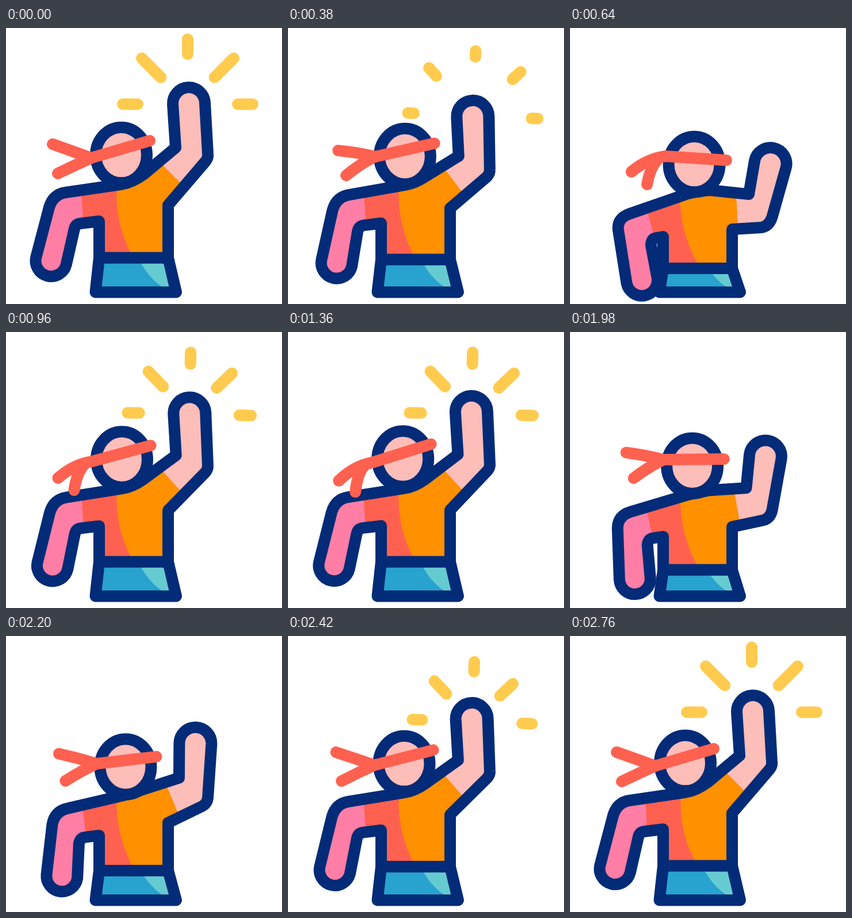
Recreate the animation shown at these times as an HTML page. Size 480 px wide and 480 px high, loop 2.98 s.

```html
<!DOCTYPE html>
<html lang="en">
<head>
<meta charset="utf-8">
<title>Raised fist</title>
<style>
  html, body { margin: 0; width: 100%; height: 100%; overflow: hidden; background: #fff; }
  svg { display: block; width: 100vw; height: 100vh; }
  .line { fill: none; stroke: #032b77; stroke-width: 20; stroke-linecap: round; stroke-linejoin: round; }
  .band, .ray { fill: none; stroke: #ff6150; stroke-width: 20; stroke-linecap: round; stroke-linejoin: round; }
  .ray { stroke: #ffcb4f; }
</style>
</head>
<body>
<svg viewBox="0 0 480 480">
  <defs>
    <clipPath id="bodyClip"><path id="clipShape"/></clipPath>
    <clipPath id="beltClip"><path id="beltShape"/></clipPath>
  </defs>
  <g clip-path="url(#bodyClip)">
    <rect width="480" height="480" fill="#ff6150"/>
    <path id="shirt" fill="#ff9000"/>
    <path id="sleeve" fill="#ff7ea5"/>
    <path id="skin" fill="#fdbdb9"/>
  </g>
  <path id="body" class="line"/>
  <g clip-path="url(#beltClip)">
    <rect width="480" height="480" fill="#28a2ce"/>
    <path d="M233 405Q246 432 271 450L310 470L290 390Z" fill="#66cbd1"/>
  </g>
  <path id="belt" class="line"/>
  <ellipse id="head" rx="44.5" ry="48.3" class="line" style="fill:#fdbdb9"/>
  <path id="band" class="band"/>
  <path id="tails" class="band"/>
  <path id="rays" class="ray"/>
</svg>
<script>
const LOOP = 2980;
const $ = id => document.getElementById(id);
const draw = (id, d) => $(id).setAttribute('d', d);
const mix = (a, b, k) => a + (b - a) * k;
const sine = t => (1 - Math.cos(Math.PI * t)) / 2;

// Each part: keyed values, 0 = arm raised, 1 = fully crouched.
const TRACKS = {
  body: [[220, 0], [790, 1], [1000, 0], [1200, .7], [1400, 0], [1600, .7], [1800, 0], [2000, .7], [2760, 0]],
  waist: [[220, 0], [790, 1], [960, 0], [1200, .7], [1360, 0], [1600, .7], [1760, 0], [2000, .7], [2760, 0]],
  head: [[220, 0], [790, 1], [1000, -.02], [1200, .6], [1400, -.12], [1600, .6], [1800, -.12], [2000, .7], [2760, 0]],
  droop: [[220, 0], [700, 1], [1000, 1], [1200, .8], [1400, 1.08], [1600, .8], [1800, 1.08], [2000, .2], [2760, 0]],
  rays: [[220, 0], [800, 1], [1000, 0], [1200, 1], [1400, 0], [1600, 1], [1800, 0], [2000, 1], [2760, 0]]
};

function sample(track, t) {
  if (t <= track[0][0]) return { v: track[0][1], rising: true };
  for (let i = 1; i < track.length; i++) {
    const [t0, a] = track[i - 1], [t1, b] = track[i];
    if (t < t1) {
      let k = (t - t0) / (t1 - t0);
      if (i === track.length - 1) k = 1 - Math.pow(1 - k, 1.72); // slow settle
      return { v: mix(a, b, sine(k)), rising: b < a };
    }
  }
  return { v: 0, rising: true };
}

// Quadratic through raised, middle and low poses.
const MID = .45, LOW = .84;
const bend = (p, a, b, c) =>
  a * (p - MID) * (p - LOW) / (MID * LOW) +
  b * p * (p - LOW) / (MID * (MID - LOW)) +
  c * p * (p - MID) / (LOW * (LOW - MID));

const fix = n => n.toFixed(2);
const xy = (x, y) => fix(x) + ' ' + fix(y) + ' ';

function cap(x, y, deg, r) {
  const a = deg * Math.PI / 180, c = r * Math.cos(a), s = r * Math.sin(a);
  return { left: xy(x - c, y - s), right: xy(x + c, y + s) };
}

function drawBody(p, w) {
  const n = (a, b, c) => bend(p, a, b, c);
  const pt = (ax, ay, bx, by, cx, cy) => xy(n(ax, bx, cx), n(ay, by, cy));
  const waist = bend(w, 399.7, 408, 418);
  const low = cap(n(78.5, 97.5, 125), n(405, 418, 439), n(14, 7, -10), 27);
  const high = cap(n(318, 329.5, 348.5), n(131, 187, 236), n(-3, 2, 12), 28);

  const d = 'M' + xy(162, waist) +
    'L' + pt(162, 336, 162, 347, 162, 363) +
    'L' + pt(129, 340, 138, 350, 150, 365) +
    'Q' + pt(121, 341, 129, 351, 141, 366) + pt(119, 349, 127, 361, 141, 378) +
    'L' + low.right + 'A27 27 0 0 1 ' + low.left +
    'L' + pt(75, 312, 80.5, 328, 84, 352) +
    'Q' + pt(82, 289, 84.5, 305, 81, 331) + pt(104, 286, 107, 300, 104, 323) +
    'L' + pt(200, 272, 205, 277, 205, 288) +
    'Q' + pt(220, 269, 222, 274, 222, 284) + pt(240, 254, 238, 267, 243, 282) +
    'L' + pt(295, 208, 301, 247, 311, 289) +
    'L' + high.left + 'A28 28 0 0 1 ' + high.right +
    'L' + pt(351, 219, 351, 282, 352, 327) +
    'Q' + pt(352, 226, 350, 291, 347, 345) + pt(347, 232, 342, 296, 332, 347) +
    'L' + pt(282, 308, 282, 325, 282, 350) +
    'L' + xy(282, waist) + 'Z';
  draw('body', d);
  draw('clipShape', d);

  draw('shirt', 'M191 200L' + xy(n(192.5, 192, 191), 280) +
    'Q' + xy(n(190, 191, 189), n(345, 350, 358)) + xy(n(221.5, 224, 227), waist) + 'L320 ' + fix(waist) + 'V200Z');
  draw('sleeve', 'M0 0L' + pt(131, 285, 133, 300, 134, 318) +
    'L' + pt(134, 335, 139, 345, 146, 362) + 'V480H0Z');
  const top = pt(262, 228, 280, 262, 289, 290);
  draw('skin', 'M' + top + 'V0H480V480L' + pt(310, 276, 300, 310, 292, 345) + 'Z');

  const belt = 'M' + xy(162, waist) + 'L155.5 459.5H296L' + xy(282, waist) + 'Z';
  draw('belt', belt);
  draw('beltShape', belt);
}

function drawHead(h, droop) {
  const n = (a, b, c) => bend(h, a, b, c);
  $('head').setAttribute('cx', fix(n(200.5, 208, 216)));
  $('head').setAttribute('cy', fix(n(221, 227.5, 237)));
  const kx = n(148, 158, 166), ky = n(226, 222, 223);
  draw('band', 'M' + xy(kx, ky) + 'L' + xy(n(250, 261.5, 272), n(196, 210, 230)));
  const at = (ax, ay, bx, by) => xy(kx + mix(ax, bx, droop), ky + mix(ay, by, droop));
  draw('tails',
    'M' + xy(kx, ky) + 'Q' + at(-33, -12, -32, 5) + at(-67, -24, -59, 29) +
    'M' + at(0, 0, -12, 4) + 'Q' + at(-29, 13, -26, 17) + at(-58, 27, -31, 50));
}

function drawRays({ v, rising }) {
  const from = rising ? 0 : v / .3;
  const to = rising ? 1 - v / .42 : 1;
  let d = '';
  if (to > from) {
    for (let i = 0; i < 5; i++) {
      const a = (180 + 45 * i + 14 * v) * Math.PI / 180;
      const inner = i % 2 ? 66 : 87;
      const spot = k => {
        const r = mix(inner, 113, k);
        return xy(316 + 30 * v + r * Math.cos(a), 132.5 + 113 * v + r * Math.sin(a));
      };
      d += 'M' + spot(from) + 'L' + spot(to);
    }
  }
  draw('rays', d);
}

function render(t) {
  drawBody(sample(TRACKS.body, t).v, sample(TRACKS.waist, t).v);
  drawHead(sample(TRACKS.head, t).v, sample(TRACKS.droop, t).v);
  drawRays(sample(TRACKS.rays, t));
}

const start = performance.now();
function tick() {
  render((performance.now() - start) % LOOP);
  requestAnimationFrame(tick);
}
render(0);
requestAnimationFrame(tick);
</script>
</body>
</html>
```
